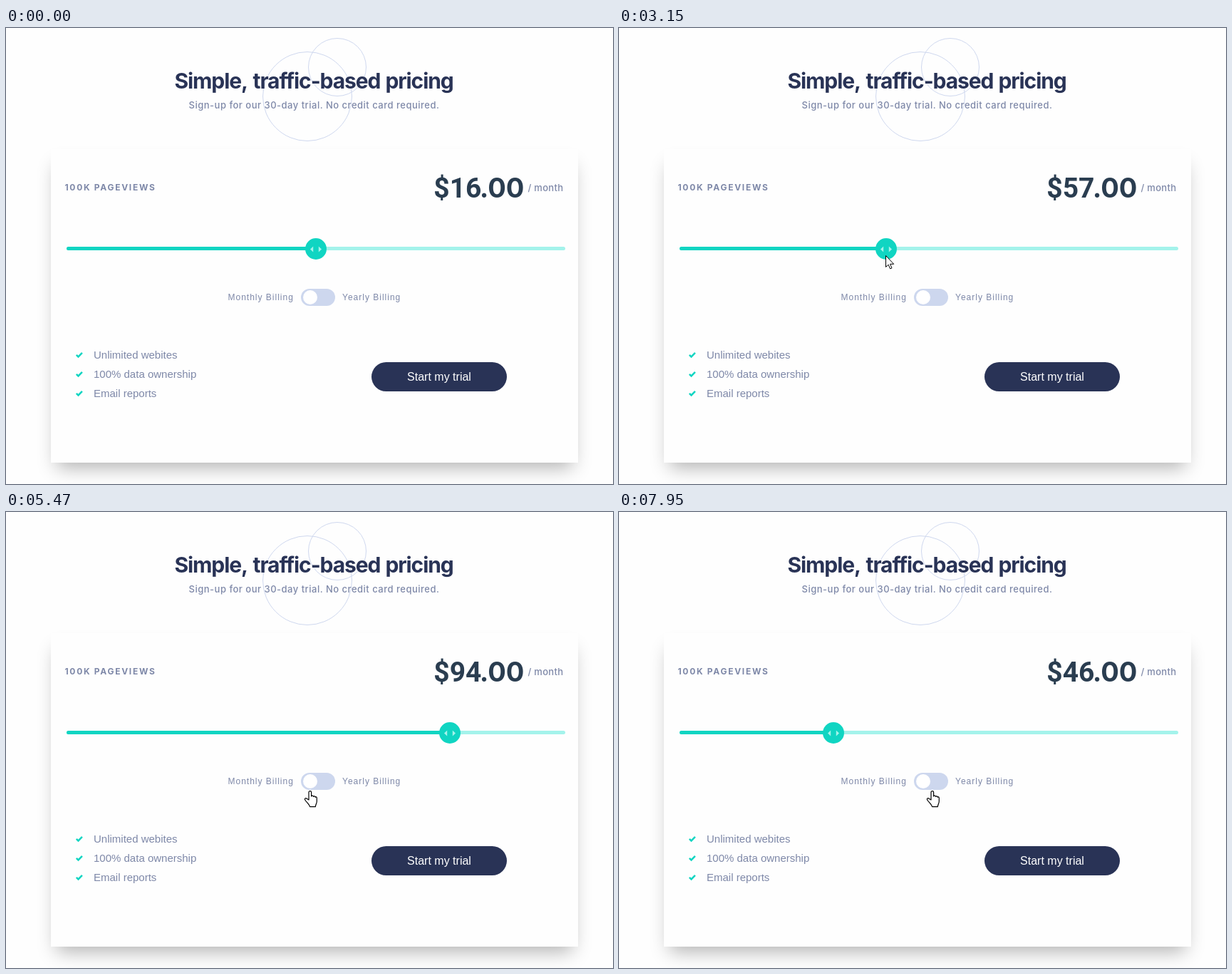
These frames come from a looping animation (852x640 px, 8000 ms). An HTML page:

```html
<!DOCTYPE html>
<html lang="en">
<head>
<meta charset="utf-8">
<title>Pricing slider</title>
<style>
  html, body { margin: 0; width: 100%; height: 100%; overflow: hidden; background: #fefefe; }
  .card {
    position: absolute; left: 63px; top: 170px; width: 740px; height: 440px; background: #fefefe;
    box-shadow: 0 15px 25px -8px rgba(0, 0, 0, .3);
  }
  svg { position: absolute; left: 0; top: 0; }
  text { fill: #7e88a8; font-family: Inter, sans-serif; }
  .title { font-size: 30px; font-weight: 700; letter-spacing: -1.1px; fill: #293356; }
  .sub { font-size: 13px; font-weight: 500; letter-spacing: .5px; }
  .views { font-size: 12px; font-weight: 700; letter-spacing: 1.7px; }
  .unit { font-size: 13px; font-weight: 500; letter-spacing: .3px; }
  .price { font-weight: 700; fill: #2a3d50; text-anchor: end; }
  .whole { font: 700 39px Roboto, sans-serif; }
  .cents { font-size: 38px; }
  .arial, .billing { font-family: "Liberation Sans", Arial, sans-serif; font-size: 15px; }
  .billing { font-size: 12px; letter-spacing: 1px; }
  .button { font-size: 16px; fill: #fff; text-anchor: middle; }
  .ring { fill: none; stroke: #cfd8ef; }
  .tick { fill: none; stroke: #10d5c2; stroke-width: 2.5; }
  .cursor { fill: #fff; stroke: #000; stroke-linejoin: round; }
</style>
</head>
<body>
<div class="card"></div>
<svg width="852" height="640" viewBox="0 0 852 640">
  <circle class="ring" cx="423" cy="96" r="62.5"/>
  <circle class="ring" cx="465" cy="55" r="40.5"/>
  <text class="title" y="85"><tspan x="236.5">Simple,</tspan><tspan x="346.5">traffic-based</tspan><tspan x="532.5">pricing</tspan></text>
  <text class="sub" x="256.5" y="113">Sign-up for our 30-day trial. No credit card required.</text>

  <text class="views" x="82.5" y="228">100K PAGEVIEWS</text>
  <text class="price whole" id="whole" x="667.5" y="238"></text>
  <text class="price cents" id="cents" x="727.5" y="238"></text>
  <text class="unit" x="732.5" y="229">/ month</text>

  <rect x="85" y="307" width="700" height="5" rx="2.5" fill="#a4f3eb"/>
  <rect id="fill" x="85" y="307" height="5" rx="2.5" fill="#10d5c2"/>
  <g id="thumb">
    <circle cy="310" r="15" fill="#10d5c2"/>
    <path d="M-8 310.5l4.2-4v8zM8 310.5l-4.2-4v8z" fill="#a4f3eb"/>
  </g>

  <text class="billing" x="311.5" y="382">Monthly Billing</text>
  <rect id="toggle" x="414" y="366" width="48" height="24" rx="12"/>
  <circle id="knob" cy="378" r="10" fill="#fff"/>
  <text class="billing" x="472" y="382">Yearly Billing</text>

  <path class="tick" d="M98.8 458.8l2.7 2.6 5.4-5.6m-8.1 30l2.7 2.6 5.4-5.6m-8.1 30l2.7 2.6 5.4-5.6"/>
  <text class="arial" x="123" y="464">Unlimited webites</text>
  <text class="arial" x="123" y="491">100% data ownership</text>
  <text class="arial" x="123" y="518">Email reports</text>
  <rect x="513" y="469" width="190" height="41" rx="20.5" fill="#293356"/>
  <text class="arial button" x="608" y="495">Start my trial</text>

  <path class="cursor" id="arrow" d="M.5.5V16.5L4.2 13.2 6.6 18.9 9 17.9 6.6 12.3H11.7Z"/>
  <path class="cursor" id="hand" stroke-width="1.2" d="M-3 13V2.4a1.8 1.8 0 0 1 3.6 0V8c.3-1.4 3-1.3 3 .6 .3-1.3 2.7-1 2.7.8 .3-1.1 2-.7 2 1V15c0 3-1.6 4.2-2 7.6H-1.5C-2.1 19.4-6.3 16.4-8.3 13c-1.1-1.9.9-3 2.4-1.8z"/>
</svg>
<script>
const LOOP = 8000, ENTER = 360, STEP = 77.45;
const FIRST_DRAG = 1640, YEARLY_ON = 5540, YEARLY_OFF = 6630;
const $ = id => document.getElementById(id);

// Each move eases the pointer to x, y and, when dragging, the slider to a value
const moves = [
  { at: ENTER, lasts: 620, x: 433, y: 301 },
  { at: FIRST_DRAG, lasts: 560, x: 304, y: 309, value: 31 },
  { at: 2480, lasts: 365, x: 255, y: 321, value: 24 },
  { at: 2850, lasts: 770, x: 446, y: 317, value: 51 },
  { at: 3620, lasts: 780, x: 634, y: 308, value: 78 },
  { at: 4640, lasts: 820, x: 428, y: 391 },
  { at: YEARLY_ON, lasts: 230, x: 417, y: 437 },
  { at: 5930, lasts: 700, x: 452, y: 383 },
  { at: YEARLY_OFF, lasts: 230, x: 467, y: 335 },
  { at: 6880, lasts: 200, x: 489, y: 309, value: 57 },
  { at: 7230, lasts: 400, x: 305, y: 312, value: 30 },
  { at: 7640, lasts: 300, x: 441, y: 391 }
];

function easeOut(time, at, lasts) {
  const p = Math.min(1, Math.max(0, (time - at) / lasts));
  return 1 - (1 - p) ** 2;
}

function stateAt(time) {
  const state = { x: 646, y: 625, value: 50 };
  for (const { at, lasts, ...goal } of moves) {
    const eased = easeOut(time, at, lasts);
    for (const key in goal) state[key] += (goal[key] - state[key]) * eased;
  }
  for (const key in state) state[key] = Math.round(state[key]);
  return state;
}

const toggleState = (time, lasts) =>
  easeOut(time, YEARLY_ON, lasts) - easeOut(time, YEARLY_OFF, lasts);

function drawPrice(time, value) {
  const yearly = time >= YEARLY_ON && time < YEARLY_OFF;
  const price = time < FIRST_DRAG ? 16 : (16 + value) * (yearly ? .75 : 1);
  const [whole, cents] = price.toFixed(2).split('.');
  $('whole').textContent = '$' + whole;
  $('cents').textContent = '.' + cents;
}

function drawSlider(value) {
  const x = Math.round(100 + 6.7 * value);
  $('thumb').setAttribute('transform', `translate(${x})`);
  $('fill').setAttribute('width', x - 85);
}

function drawToggle(time) {
  const on = toggleState(time, 400);
  const mix = (a, b) => Math.round(a + (b - a) * on);
  $('toggle').setAttribute('fill', `rgb(${mix(205, 16)},${mix(215, 213)},${mix(238, 194)})`);
  $('knob').setAttribute('cx', 427 + 22 * toggleState(time, 200));
}

function drawCursor(time, x, y) {
  const overToggle = x > 410 && x < 465 && y > 366 && y < 400;
  for (const id of ['arrow', 'hand']) {
    const shown = time >= ENTER && overToggle === (id === 'hand');
    $(id).setAttribute('visibility', shown ? 'visible' : 'hidden');
    $(id).setAttribute('transform', `translate(${x} ${y})`);
  }
}

// The picture advances in even steps, as a screen recording does
function draw(time) {
  const stepped = ENTER + STEP * Math.floor((time - ENTER + 8) / STEP);
  const { x, y, value } = stateAt(stepped);
  drawPrice(stepped, value);
  drawSlider(value);
  drawToggle(stepped);
  drawCursor(stepped, x, y);
}

const start = performance.now();
function tick() {
  draw((performance.now() - start) % LOOP);
  requestAnimationFrame(tick);
}
tick();
</script>
</body>
</html>
```
